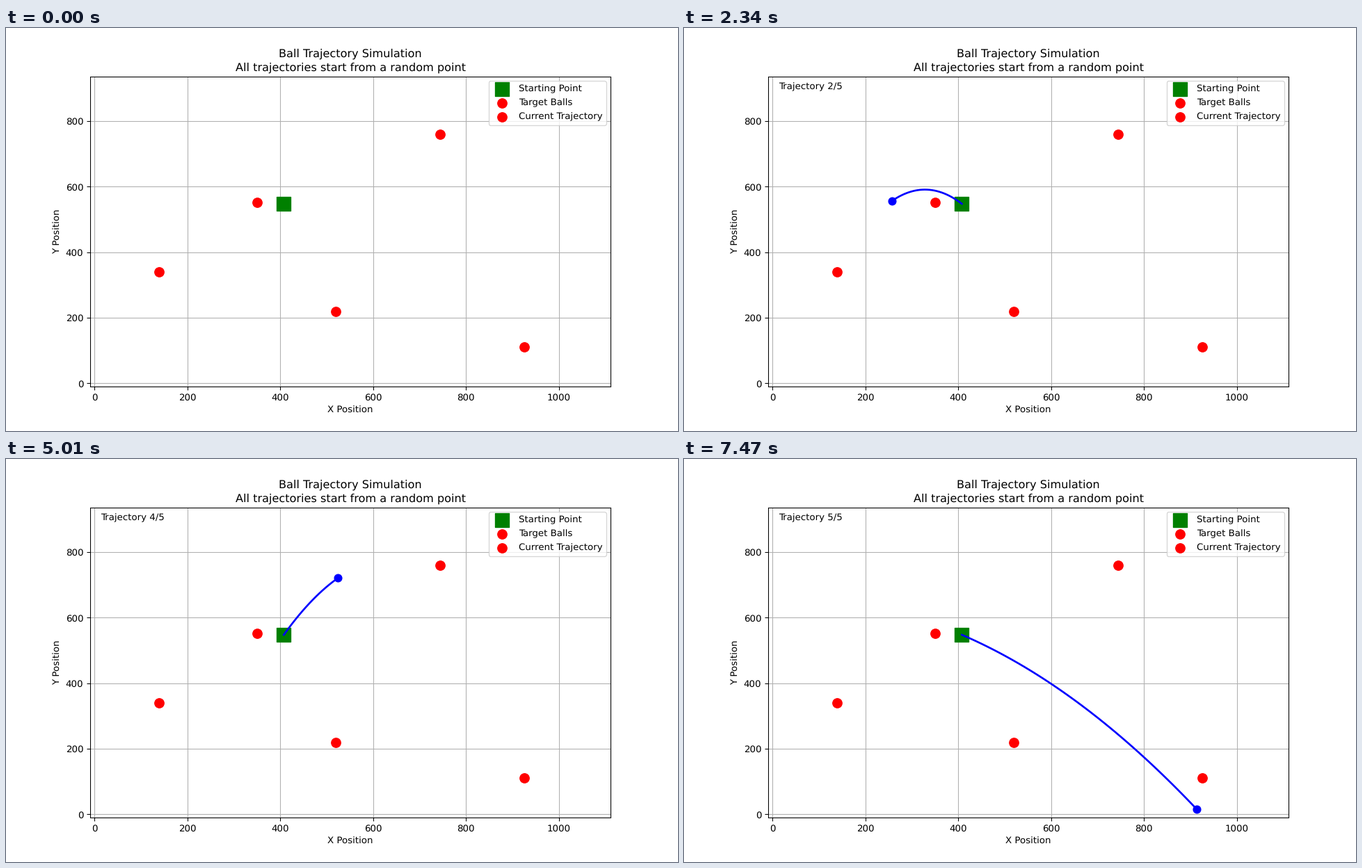
Recreate the animation shown at these times as a matplotlib script. Size 966 px wide and 580 px high, loop 7500 ms.

```python
import numpy as np
import matplotlib.pyplot as plt
from matplotlib.animation import FuncAnimation

DPI = 96.6
STEPS = 50
G = 9.81
START = (407.5, 548)
TARGETS = [(138.8, 341), (349.3, 552), (519.5, 220), (743.9, 761), (925.7, 111.2)]

# end x, end y, flight time
FLIGHTS = [(257, 0, 5.0), (140, 349, 10), (525.5, 0, 5.04), (749.5, 732.7, 10), (924, 0, 6.9)]


def flight_path(end_x, end_y, duration):
    """Projectile path from START to the given end point."""
    t = np.linspace(0, duration, STEPS + 1)
    vx = (end_x - START[0]) / duration
    vy = (end_y - START[1]) / duration + G * duration / 2
    return START[0] + vx * t, START[1] + vy * t - G * t**2 / 2


paths = [flight_path(*flight) for flight in FLIGHTS]

plt.rcParams["text.hinting"] = "none"
fig, ax = plt.subplots(figsize=(966 / DPI, 580 / DPI), dpi=DPI)
ax.set_xlim(-10, 1111.8)
ax.set_ylim(-10, 936.8)
ax.grid(True)
ax.set_title("Ball Trajectory Simulation\nAll trajectories start from a random point",
             linespacing=1.36)
ax.set_xlabel("X Position")
ax.set_ylabel("Y Position")

ax.scatter(*START, c="green", s=225, marker="s", label="Starting Point", zorder=3)
ax.scatter(*zip(*TARGETS), c="red", s=100, label="Target Balls", zorder=3)
ax.scatter([], [], c="red", s=100, label="Current Trajectory")
ax.legend(loc="upper right", labelspacing=0.55)

trail, = ax.plot([], [], "b-", lw=2, zorder=4)
ball, = ax.plot([], [], "bo", markersize=8, zorder=4)
caption = ax.text(0.02, 0.98, "", transform=ax.transAxes, va="top")


def update(frame):
    index, step = divmod(frame, STEPS)
    if step == 0:
        # each flight opens on an empty field
        trail.set_data([], [])
        ball.set_data([], [])
        caption.set_text("")
    else:
        x, y = paths[index]
        trail.set_data(x[:step + 1], y[:step + 1])
        ball.set_data([x[step]], [y[step]])
        caption.set_text(f"Trajectory {index + 1}/{len(paths)}")
    return trail, ball, caption


anim = FuncAnimation(fig, update, frames=STEPS * len(paths), interval=30,
                     repeat=True, repeat_delay=0, blit=False)
plt.show()
```
